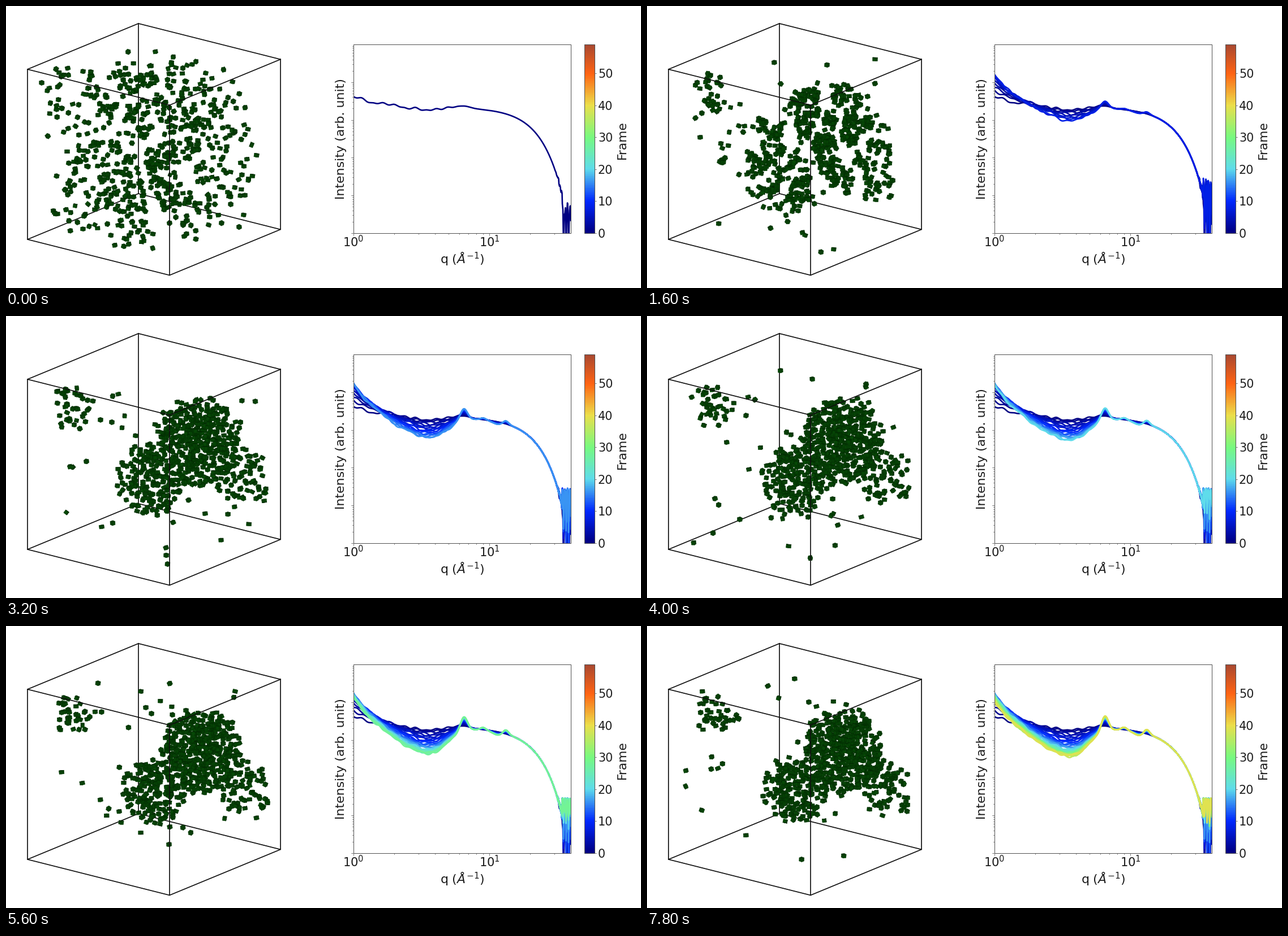
Write a matplotlib script that moves like this. It is 1122 by 499 pixels and loops after 8 s.

```python
import numpy as np
import matplotlib.pyplot as plt
from matplotlib.animation import FuncAnimation
from matplotlib.collections import PolyCollection
from matplotlib.colors import LinearSegmentedColormap
from matplotlib.patches import Rectangle

W, H, DPI = 1122, 499, 100
FRAMES, STEP_MS = 40, 200
PT = 72 / DPI
INK = "#1c1c1c"
plt.rcParams["font.family"] = "DejaVu Sans"

fig = plt.figure(figsize=(W / DPI, H / DPI), dpi=DPI, facecolor="white")
ax = fig.add_axes([0, 0, 1, 1])
ax.axis("off")


def segment(a, b, z, color="#101010", width=1.7):
    ax.plot([a[0], b[0]], [a[1], b[1]], color=color, lw=width * PT, zorder=z,
            solid_capstyle="round")


def bump(x, centre, width):
    return np.exp(-((x - centre) / width) ** 2)


# ---------- simulation box ----------
BACK = np.array([234.0, 31.0])
EDGES = np.array([[-196.0, 81.0], [251.0, 63.4], [0.0, 301.0]])
LENGTH = np.linalg.norm(EDGES[:, 0])
HIDDEN = (0, 0, 1)


def project(p):
    return BACK + np.asarray(p, float) @ EDGES


for axis in range(3):
    for u in (0, 1):
        for v in (0, 1):
            ends = [np.insert([u, v], axis, w) for w in (0, 1)]
            behind = HIDDEN in [tuple(e) for e in ends]
            segment(*project(ends), 1 if behind else 5)

# ---------- particles ----------
rng = np.random.default_rng(11)
BOUND, GAS = 660, 42
SIDE = 6.2

# final aggregates: x, y, share of the particles
NUCLEI = np.array([(347, 222, .58), (264, 290, .25),
                   (420, 285, .12), (119, 158, .05)])


def in_strips(pts):
    """Order points so that neighbours of two sets pair up."""
    by_x = pts[np.argsort(pts[:, 0])]
    return np.vstack([s[np.argsort(s[:, 1])]
                      for s in np.array_split(by_x, 25)])


def aggregate():
    """Points filling the nuclei, each keeping some distance to the others."""
    pts = np.empty((BOUND, 2))
    for i, k in enumerate(rng.choice(4, BOUND, p=NUCLEI[:, 2])):
        x, y, share = NUCLEI[k]
        d = rng.normal(size=(2, 3))
        d /= np.linalg.norm(d, axis=1, keepdims=True)
        radius = 88 * share ** .27 * rng.random((2, 1)) ** .42
        tries = (x, y) + d[:, :2] * radius
        gap = np.linalg.norm(tries[:, None] - pts[None, :i], axis=2)
        pts[i] = tries[gap.min(axis=1, initial=99).argmax()]
    return pts


start = in_strips(project(rng.random((BOUND, 3)) * .94 + .03))
final = in_strips(aggregate())
clump = np.linalg.norm(start[:, None] - start[None, ::30], axis=2).argmin(1)
member = np.eye(clump.max() + 1)[clump]
member /= member.sum(axis=0)
gas_start = rng.random((GAS, 3))
gas_speed = rng.normal(0, .035, (GAS, 3))
paint_order = rng.permutation(BOUND + GAS)


def positions(n, r):
    merged = 1 - np.exp(-(n / 8.5) ** 1.5)
    bound = start + merged * (final - start)
    # small local clumps form first and then join the nuclei
    pull = .1 + .42 * bump(n, 5, 4)
    if n > 8:
        pull *= 1 - merged
    means = (member.T @ bound)[clump]
    bound = bound + pull * (means - bound) + r.normal(0, 2.5, bound.shape)
    gas = project((gas_start + gas_speed * n) % 1 * .96 + .02)
    return np.vstack([bound, gas])[paint_order]


depth_part = np.sqrt(1 - (EDGES ** 2).sum(axis=1).clip(max=LENGTH ** 2)
                     / LENGTH ** 2) * (1, 1, -1)
VIEW = np.column_stack([EDGES / LENGTH, depth_part])


def cubes(n):
    r = np.random.default_rng(500 + n)
    centre = positions(n, r)
    tilted = VIEW.T + r.normal(0, .2, (len(centre), 3, 3))
    axes = np.linalg.qr(tilted)[0].transpose(0, 2, 1)
    axes = axes * np.where(axes[:, :, 2:] < 0, -1, 1)
    faces = np.empty((len(centre), 3, 4, 2))
    for k in range(3):
        a, b, c = (axes[:, (k + j) % 3, :2] * SIDE / 2 for j in range(3))
        for m, (u, v) in enumerate([(1, 1), (1, -1), (-1, -1), (-1, 1)]):
            faces[:, k, m] = centre + a + u * b + v * c
    light = axes[:, :, 2].reshape(-1, 1)
    color = np.array([.005, .18, .005]) + light * [.02, .11, .02]
    return faces.reshape(-1, 4, 2), color


swarm = PolyCollection([], linewidths=.4, zorder=3)
ax.add_collection(swarm)

# ---------- plot panel ----------
LEFT, RIGHT, TOP, BOTTOM = 614, 998, 68, 402
DECADE, Y_DECADE = 240, 66.8
UNIT = (BOTTOM - TOP) / 59

# one colour per ten steps
cmap = LinearSegmentedColormap.from_list(
    "heat", ["#000082", "#0028ff", "#5fdceb", "#78fa80", "#ebdf4b",
             "#ff6414", "#a04634"])


def label(x, y, text, size, **kw):
    ax.text(x, y, text, fontsize=size * PT, color=INK, zorder=8, **kw)


def frame_box(x, y, w, h):
    ax.add_patch(Rectangle((x, y), w, h, fill=False, ec="#505050",
                           lw=PT, zorder=7))


def tick(x, y, dx, dy):
    segment((x, y), (x + dx, y + dy), 7, "#606060", .8)


frame_box(LEFT, TOP, RIGHT - LEFT, BOTTOM - TOP)
for m in range(1, 10):
    size = 3.5 if m == 1 else 2
    for decade in range(5):
        tick(LEFT, BOTTOM - Y_DECADE * (decade + np.log10(m)), -size, 0)
    for decade in range(2):
        x = LEFT + DECADE * (decade + np.log10(m))
        if x <= RIGHT:
            tick(x, BOTTOM, 0, size)
for decade in range(2):
    label(LEFT + DECADE * decade, 426, f"$10^{decade}$", 21, ha="center")
label(806.5, 455.5, r"q ($\mathit{Å}^{-1}$)", 22, ha="center")
label(592, 235.5, "Intensity (arb. unit)", 22.2, ha="center", va="center",
      rotation=90)

ax.imshow(np.linspace(0, 59 / 60, 256)[:, None], cmap=cmap, aspect="auto",
          vmin=0, vmax=1, origin="lower", extent=(1022, 1040, BOTTOM, TOP),
          zorder=6)
frame_box(1022, TOP, 18, BOTTOM - TOP)
for v in range(0, 60, 10):
    y = BOTTOM - UNIT * v
    tick(1040, y, 3, 0)
    label(1046, y + 8, str(v), 20.8)
label(1089, 237.5, "Frame", 21.8, ha="center", va="center", rotation=90)

# ---------- scattering curves ----------
xs = np.arange(LEFT, RIGHT + .25, .5)
q = 10 ** ((xs - LEFT) / DECADE)
falloff = 85 * (q / 27.7) ** 2.75
valley = bump(xs, 748, np.where(xs < 748, 75, 42))
liquid = 5 * bump(xs, 805, 18)
crystal = (28 * bump(xs, 809, 9) + 5 * bump(xs, 843, 7)
           + 9 * bump(xs, 883, 7) - 6 * bump(xs, 868, 12))


def curve(n):
    r = np.random.default_rng(70 + n)
    order = (1 - np.exp(-n / 15)) / (1 - np.exp(-39 / 15))
    rise = 20 + 45 * (1 - np.exp(-n / 4)) - 15 * (n / 39) ** 2
    y = (180 + falloff + (5 + 45 * order) * valley
         - rise * np.exp(-(xs - LEFT) / (60 - 30 * order))
         - liquid * (1 - order) - crystal * order)
    fade = 1 / (1 + np.exp((xs - 795) / 8))
    y += fade * sum(np.sin(xs / s + r.uniform(0, 6.3)) for s in (3, 5, 8, 14))

    # ragged tail where the signal sinks into noise
    shake = np.repeat(r.normal(0, 3, xs.size // 3 + 1), 3)[:xs.size]
    y += shake * np.clip((xs - 966) / 14, 0, 1) ** 2
    knots = np.arange(983, 999.5, 1.1)
    top = 304 + 40 * np.exp(-n / 2)
    depth = 13 + 24 / (1 + np.exp((n - 16) / 1.5))
    nodes = np.cos(np.pi * (knots - 985.5) / 4.4 + r.normal(0, .25)) ** 8
    drop = depth * (2.8 * nodes * r.uniform(.5, 1.2, knots.size)
                    + r.exponential(.3, knots.size))
    tail = xs >= 983
    y[tail] = np.interp(xs[tail], knots, top + drop)
    return y


panel = Rectangle((LEFT, TOP), RIGHT - LEFT, BOTTOM - TOP,
                  transform=ax.transData)
curves = []
for n in range(FRAMES):
    line, = ax.plot(xs, curve(n), color=cmap(n / 60), lw=2.6 * PT,
                    zorder=6 + n / 100, solid_joinstyle="round")
    line.set_clip_path(panel)
    curves.append(line)

ax.set_xlim(0, W)
ax.set_ylim(H, 0)


def draw(n):
    faces, color = cubes(n)
    swarm.set_verts(faces)
    swarm.set_facecolor(color)
    swarm.set_edgecolor(color * .8)
    for i, line in enumerate(curves):
        line.set_visible(i <= n)
    return [swarm, *curves]


anim = FuncAnimation(fig, draw, frames=FRAMES, interval=STEP_MS,
                     init_func=lambda: draw(0), repeat=True, repeat_delay=0)
plt.show()
```
